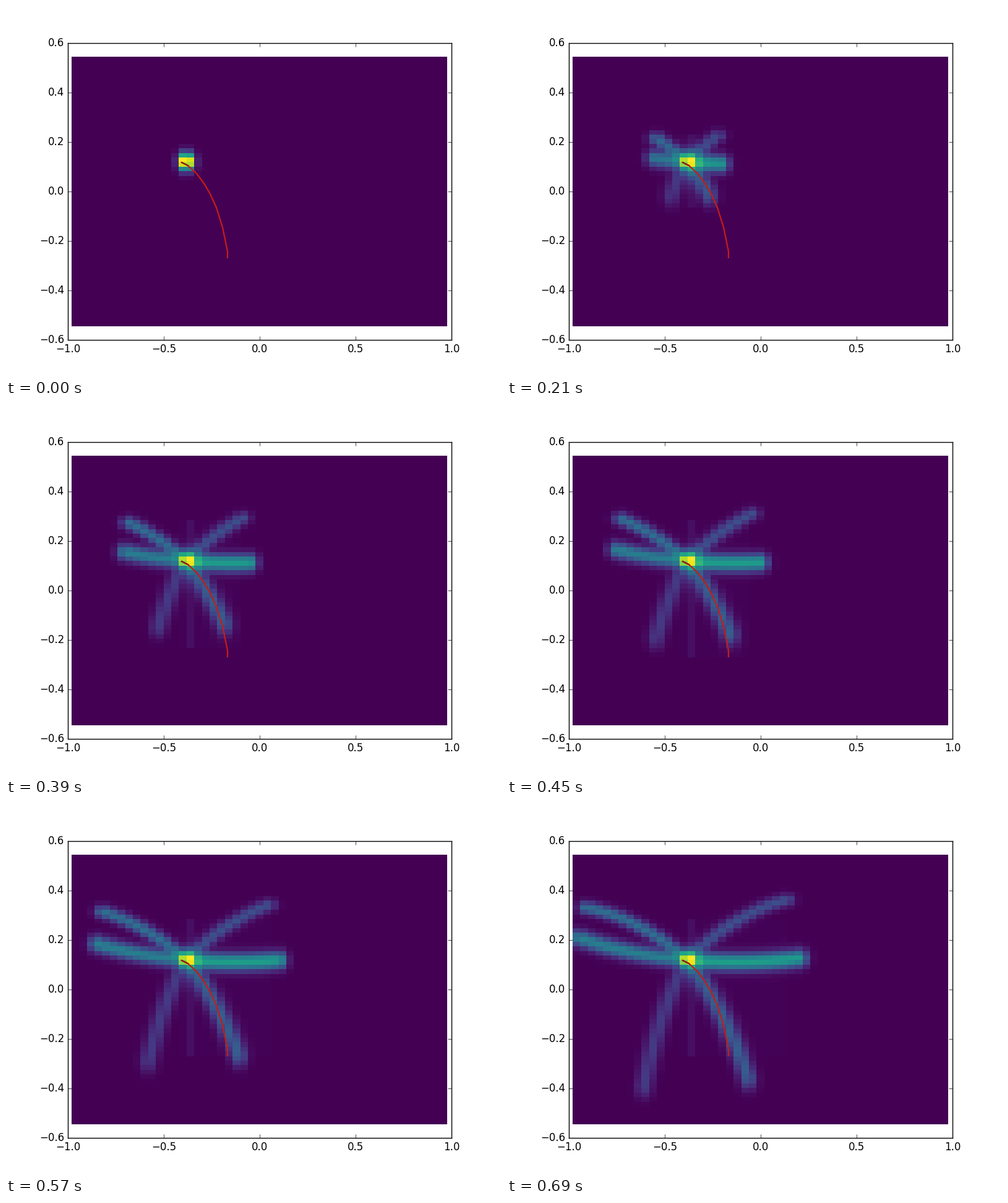
Write a matplotlib script that moves like this. It is 800 by 600 pixels and loops after 720 ms.

```python
import numpy as np
import matplotlib.pyplot as plt
from matplotlib.animation import FuncAnimation

plt.style.use("classic")
plt.rcParams["font.family"] = "DejaVu Sans"

FRAMES = 24
INTERVAL = 30
COLS, ROWS = 49, 59
SOURCE = (291, 252)

# Launch velocity and acceleration of each plume (pixels, y down), strength.
PLUMES = [
    ((-7.1, -6.1), (0, 0.106), 0.36),
    ((-7.6, -0.5), (0, -0.045), 0.43),
    ((7.9, 0.7), (0, -0.035), 0.55),
    ((5.4, 7.2), (-0.048, 0.05), 0.29),
    ((-4.0, 7.2), (0.042, 0.075), 0.17),
    ((7.0, -6.75), (0, 0.11), 0.24),
]


def to_data(px, py):
    return (np.asarray(px) - 410) / 310, (300 - np.asarray(py)) / 400


x_edges = np.linspace(105.8, 713.4, COLS + 1)
y_edges = np.linspace(82.45, 518.45, ROWS + 1)
X, Y = np.meshgrid((x_edges[1:] + x_edges[:-1]) / 2,
                   (y_edges[1:] + y_edges[:-1]) / 2)


def gauss(cx, cy, sx, sy):
    return np.exp(-((X - cx) / sx) ** 2 / 2 - ((Y - cy) / sy) ** 2 / 2)


def plume(k, velocity, accel, strength):
    """Ridge left along the path travelled up to step k."""
    spread = 9.5 + 0.4 * velocity[1]
    ridge = np.zeros_like(X)
    for t in np.linspace(0, k, 4 * k + 1):
        x, y = (s + v * t + a * t * t
                for s, v, a in zip(SOURCE, velocity, accel))
        ridge = np.maximum(ridge, gauss(x, y, 9, spread))
    return strength * ridge


def haze(k):
    """Faint glow behind the plumes, with a brighter column near the source."""
    top, bottom = max(187, 252 - 6 * k), min(405, 252 + 11 * k)
    inside = (Y > top) & (Y < bottom) & (X > 280) & (X < 291 + 7 * k)
    return inside * (0.006 + 0.03 * (abs(X - 298) < 6))


def density(k):
    z = np.sqrt(sum(plume(k, *p) ** 2 for p in PLUMES))
    z += 0.25 * gauss(298, 251, 10, 10)
    z += 0.6 * np.exp(-k / 4) * gauss(294, 253, 18, 17)
    z += haze(k)
    puff = gauss(291.5, 251.5, 8, 9.5)
    w = np.exp(-1.2 * k)
    return w * puff / puff.max() + (1 - w) * z / max(1, z.max())


fields = [density(k) for k in range(FRAMES)]

fig = plt.figure(figsize=(8, 6), dpi=100, facecolor="white")
ax = fig.add_axes([0.125, 0.1, 0.775, 0.8])
mesh = ax.pcolormesh(*to_data(x_edges, y_edges), fields[0],
                     cmap="viridis", vmin=0, vmax=1, shading="flat")

curve = to_data([284, 294, 308, 320, 330, 340, 350, 358, 358],
                [253, 258, 271, 287, 304, 326, 358, 397, 407])
ax.plot(*curve, color="#c81c14", lw=1.6)
ax.plot(curve[0][:2], curve[1][:2], color="#8a1c18", lw=1.6)

ax.set_xlim(-1, 1)
ax.set_ylim(-0.6, 0.6)
ax.set_xticks(np.linspace(-1, 1, 5))
ax.set_yticks(np.linspace(-0.6, 0.6, 7))


def update(k):
    mesh.set_array(fields[k])
    return (mesh,)


anim = FuncAnimation(fig, update, frames=FRAMES, interval=INTERVAL,
                     repeat=True, repeat_delay=0, blit=False)
plt.show()
```
